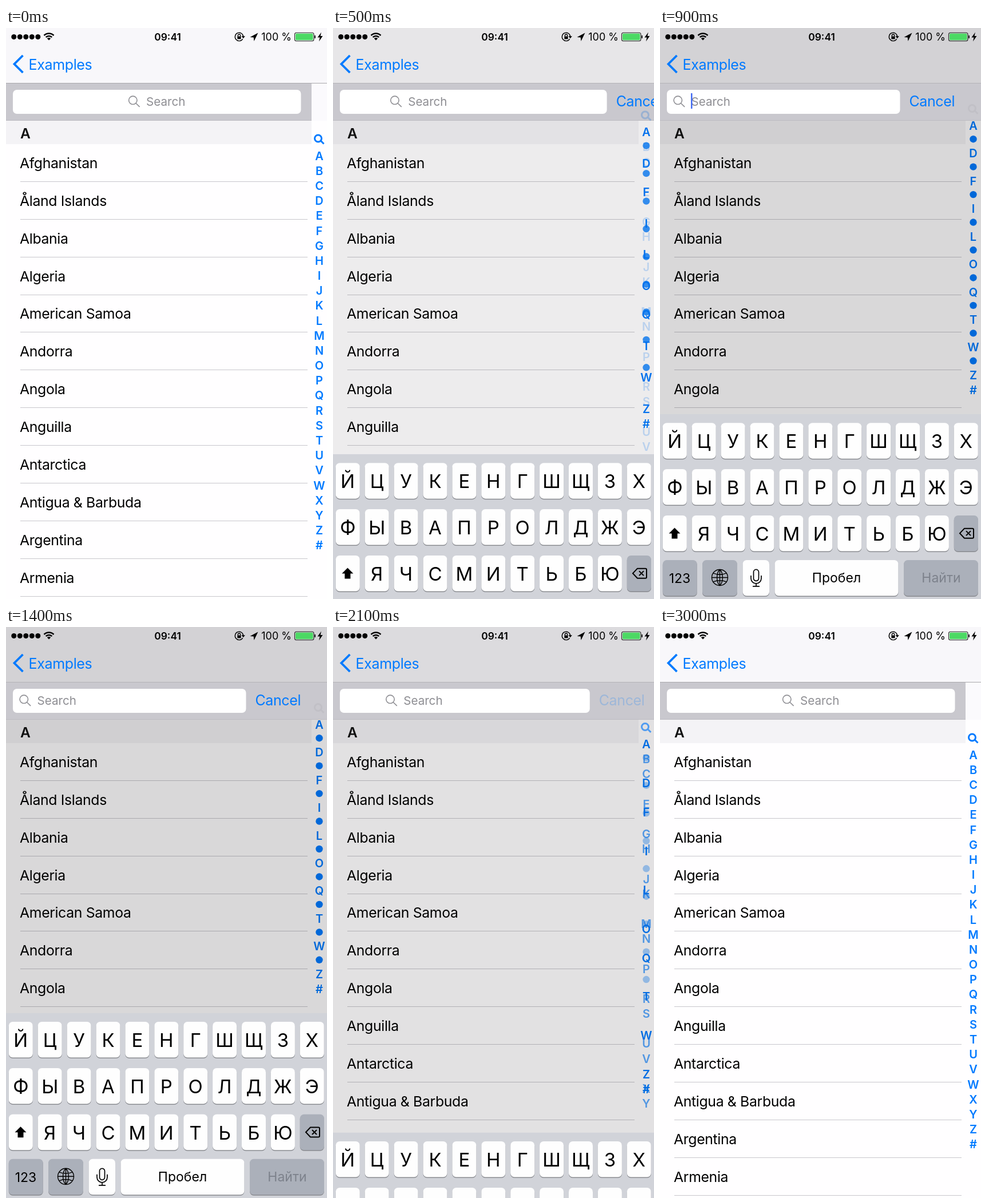
An HTML page with a canvas for the animation above (3100 ms loop, 561x998 px).

```html
<!DOCTYPE html>
<html lang="en">
<head>
<meta charset="utf-8">
<title>Country list search</title>
<style>
  html, body { margin: 0; width: 100%; height: 100%; overflow: hidden; background: #fff; }
  canvas { display: block; width: 561px; height: 998px; }
</style>
</head>
<body>
<canvas id="stage" width="561" height="998"></canvas>
<script>
const ctx = document.getElementById('stage').getContext('2d');
const W = 561, H = 998, LOOP = 3100, STEP = 100;
const OPEN = 342, PRESS = 1900, CLOSE = 1995;
const BLUE = '#007aff', GRAY = '#8e8e93', BAR = '#c9c8ce';

const COUNTRIES = ['Afghanistan', 'Åland Islands', 'Albania', 'Algeria', 'American Samoa', 'Andorra',
  'Angola', 'Anguilla', 'Antarctica', 'Antigua & Barbuda', 'Argentina', 'Armenia'];
const LETTERS = [...'ABCDEFGHIJKLMNOPQRSTUVWXYZ#'];
const SHORT_INDEX = [...'ADFILOQTWZ'];
const KEY_ROWS = ['ЙЦУКЕНГШЩЗХ', 'ФЫВАПРОЛДЖЭ', ' ЯЧСМИТЬБЮ'];

// --- timing helpers ---
const clamp = v => Math.min(1, Math.max(0, v));
const mix = (a, b, p) => a + (b - a) * p;
const ease = v => (1 - Math.cos(Math.PI * clamp(v))) / 2;
const spring = (ms, rate) => {
  const x = Math.max(0, ms) * rate / 1000;
  return 1 - (1 + x) * Math.exp(-x);
};
const openClose = (t, start, duration) => ease((t - start) / duration) - ease((t - CLOSE) / duration);

// --- drawing helpers ---
// cy is the vertical middle of the capital letters
function text(str, x, cy, size, color = '#000', { weight = 400, align = 'left', spacing = 0 } = {}) {
  ctx.font = `${weight} ${size}px Inter, sans-serif`;
  ctx.letterSpacing = spacing + 'px';
  ctx.textAlign = align;
  ctx.fillStyle = color;
  ctx.fillText(str, x, cy + size * 0.3636);
}

function rect(x, y, w, h, color) {
  ctx.fillStyle = color;
  ctx.fillRect(x, y, w, h);
}

function rounded(x, y, w, h, r, color) {
  ctx.beginPath();
  ctx.roundRect(x, y, w, h, r);
  ctx.fillStyle = color;
  ctx.fill();
}

function disc(x, y, r, color) {
  ctx.beginPath();
  ctx.arc(x, y, r, 0, Math.PI * 2);
  ctx.fillStyle = color;
  ctx.fill();
}

function path(d, x, y, color, lineWidth = 0) {
  const shape = new Path2D(d);
  ctx.save();
  ctx.translate(x, y);
  if (lineWidth) {
    ctx.strokeStyle = color;
    ctx.lineWidth = lineWidth;
    ctx.stroke(shape);
  } else {
    ctx.fillStyle = color;
    ctx.fill(shape);
  }
  ctx.restore();
}

function withAlpha(alpha, draw) {
  if (alpha <= 0) return;
  ctx.save();
  ctx.globalAlpha = alpha;
  draw();
  ctx.restore();
}

// --- screen parts ---
function drawList() {
  rect(0, 0, W, H, '#fffeff');
  rect(0, 0, W, 96, '#f8f7fa');
  rect(534, 97, 27, 65, '#fbfafd');
  rect(0, 162, 534, 41, '#f4f3f6');
  text('A', 25, 184, 24.5, '#111', { weight: 600 });
  COUNTRIES.forEach((name, i) => {
    const y = 236 + i * 65.87;
    text(name, 24, y, 24.8, '#000', { spacing: -0.35 });
    rect(25, Math.round(y + 32), 502, 1, '#c8c7cc');
  });
}

function drawIndex(s) {
  const label = (c, y) => text(c, 547.5, y, 20, BLUE, { weight: 600, align: 'center' });
  LETTERS.forEach((c, i) => {
    const y = 223.5 + i * 26.17;
    const slot = SHORT_INDEX.indexOf(c);
    if (c === '#') label(c, mix(y, 632.5, s));
    else if (slot >= 0) label(c, mix(y, 170.5 + slot * 48.45, s));
    else withAlpha(1 - s, () => label(c, y - 53 * s));
  });
  withAlpha(s, () => {
    for (let i = 0; i < 9; i++) disc(547.5, 194.2 + i * 48.45 + 53 * (1 - s), 6.2, BLUE);
  });
}

function drawIndexGlass(s) {
  const glass = color => path('M4.5-1A6 6 0 1 1-7.5-1A6 6 0 1 1 4.5-1M3 3L8.5 8.5', 547, mix(194, 141.5, s), color, 3);
  withAlpha(1 - s, () => glass(BLUE));
  withAlpha(0.08 * s, () => glass('#606070'));
}

function drawStatus() {
  for (let i = 0; i < 5; i++) disc(13.8 + i * 10.5, 15.5, 4.5, '#000');
  path('M0 0L-3.2-3.2A4.5 4.5 0 0 1 3.2-3.2Z', 75, 21.5, '#000');
  path('M-5.3-5.3A7.5 7.5 0 0 1 5.3-5.3M-8.5-8.5A12 12 0 0 1 8.5-8.5', 75, 21.5, '#000', 2.5);
  text('09:41', 282.5, 15.5, 17.4, '#000', { weight: 600, align: 'center' });

  path('M6.2 3.8A7.2 7.2 0 1 1 7.2 0M-2.1-.5V-2.2A2.1 2.1 0 0 1 2.1-2.2V-.5', 407.5, 15.3, '#000', 1.4);
  rect(404.4, 14.6, 6.2, 4.8, '#000');
  path('M4-1H10.4L7.2 3Z', 407.5, 15.3, '#000');
  path('M7-7L-7 .5L-.8 1L0 7.5Z', 433.5, 15.5, '#000');
  text('100 %', 499, 15.5, 18, '#000', { align: 'right' });
  path('M3 0H30.5A3 3 0 0 1 33.5 3V11.5A3 3 0 0 1 30.5 14.5H3A3 3 0 0 1 0 11.5V3A3 3 0 0 1 3 0Z', 504.5, 8.2, '#222', 1.1);
  rounded(506, 9.7, 30.5, 11.5, 1.5, '#4cd964');
  rounded(539, 12.8, 2, 5.4, 1, '#222');
  path('M2-8L-4.5 1H-.5L-2 8L4.5-1.5H.5Z', 549, 15.5, '#000');
}

function drawNav() {
  drawStatus();
  path('M17 0L2 15L17 30', 12.5, 48, BLUE, 3.8);
  text('Examples', 39.5, 63.5, 25, BLUE, { spacing: -0.35 });
}

function drawSearchBar(t, s) {
  const wide = t > OPEN && t < 2250;
  const right = mix(515.5, 419.5, openClose(t, 380, 282));
  const shift = -190.5 * openClose(t, 356, 256);

  rect(0, 97, wide ? W : 534, 65, BAR);
  rect(0, 161, wide ? W : 534, 1, '#bcbbc1');
  rect(0, 96, W, 1, wide ? '#b4b3b8' : '#a9a8ac');
  drawIndexGlass(s);
  rounded(12, 108, right - 12, 42, 7, '#fff');
  path('M15 7.8A7.2 7.2 0 1 1 .6 7.8A7.2 7.2 0 1 1 15 7.8M13 13L19.6 19.4', 214 + shift, 118.5, GRAY, 1.6);
  text('Search', 245 + shift, 128.5, 20.6, GRAY);

  if (wide) {
    withAlpha(t < PRESS ? 1 : 0.22, () =>
      text('Cancel', right + 16, 127.5, 25, BLUE, { spacing: -0.4 }));
  }
  if (t >= 700 && t < CLOSE) {
    const blink = t < 1500 ? 1 - (t - 1100) / 300 : (t - 1600) / 300;
    withAlpha(clamp(blink), () => rect(54, 114, 2.5, 27, '#426bf2'));
  }
}

function key(x, y, w, color = '#fefefe') {
  rounded(x, y + 1.5, w, 62.5, 7, '#898b90');
  rounded(x, y, w, 62.5, 7, color);
}

function drawKeyboard(s) {
  const top = mix(H, 674.8, s), dark = '#abb0ba';
  if (top > H - 0.5) return;
  rect(0, top, W, H - top, '#d1d3d9');

  KEY_ROWS.forEach((row, r) => [...row].forEach((c, i) => {
    const x = 4.8 + i * 50.9, y = top + 15.2 + r * 80.9;
    key(x, y, 42);
    text(c, x + 21, y + 32, 33, '#000', { align: 'center' });
  }));

  const third = top + 177;
  path('M0-10L10 0H5V9H-5V0H-10Z', 25.5, third + 31.5, '#000');
  key(513.8, third, 42.2, dark);
  path('M-12 0L-4-8.5H10A2 2 0 0 1 12-6.5V6.5A2 2 0 0 1 10 8.5H-4ZM-1-4L7 4M7-4L-1 4', 536, third + 31.2, '#000', 2);

  const last = top + 255, mid = last + 30.5;
  key(4.8, last, 60, dark);
  text('123', 34.5, mid + 1, 23, '#000', { align: 'center' });
  key(74, last, 61, dark);
  path('M14 0A14 14 0 1 1-14 0A14 14 0 1 1 14 0M-14 0H14M0-14V14M0-14A9.5 16 0 0 0 0 14M0-14A9.5 16 0 0 1 0 14M-11.5-7.5Q0-3 11.5-7.5M-11.5 7.5Q0 3 11.5 7.5', 104.5, mid, '#000', 1.4);
  key(144.5, last, 46.5);
  path('M-4.5-10A4.5 4.5 0 0 1 4.5-10V1A4.5 4.5 0 0 1-4.5 1ZM-9-4V1A9 9 0 0 0 9 1V-4M0 10V15M-6 15H6', 168, mid + 0.5, '#000', 1.7);
  key(200.5, last, 216);
  text('Пробел', 308.5, mid, 23, '#000', { align: 'center' });
  key(426, last, 130, dark);
  text('Найти', 491.5, mid, 23, '#7d828c', { align: 'center' });
}

function draw(t) {
  const s = spring(t - OPEN, 18.26) - spring(t - CLOSE, 21);
  ctx.clearRect(0, 0, W, H);
  drawList();
  drawIndex(s);
  withAlpha(0.15 * openClose(t, 348, 320), () => rect(0, 0, W, H, '#000'));
  drawNav();
  drawSearchBar(t, s);
  drawKeyboard(s);
}

function tick() {
  const t = performance.now() % LOOP;
  draw(Math.floor(t / STEP) * STEP); // the picture advances ten times a second
  requestAnimationFrame(tick);
}
tick();
</script>
</body>
</html>
```
